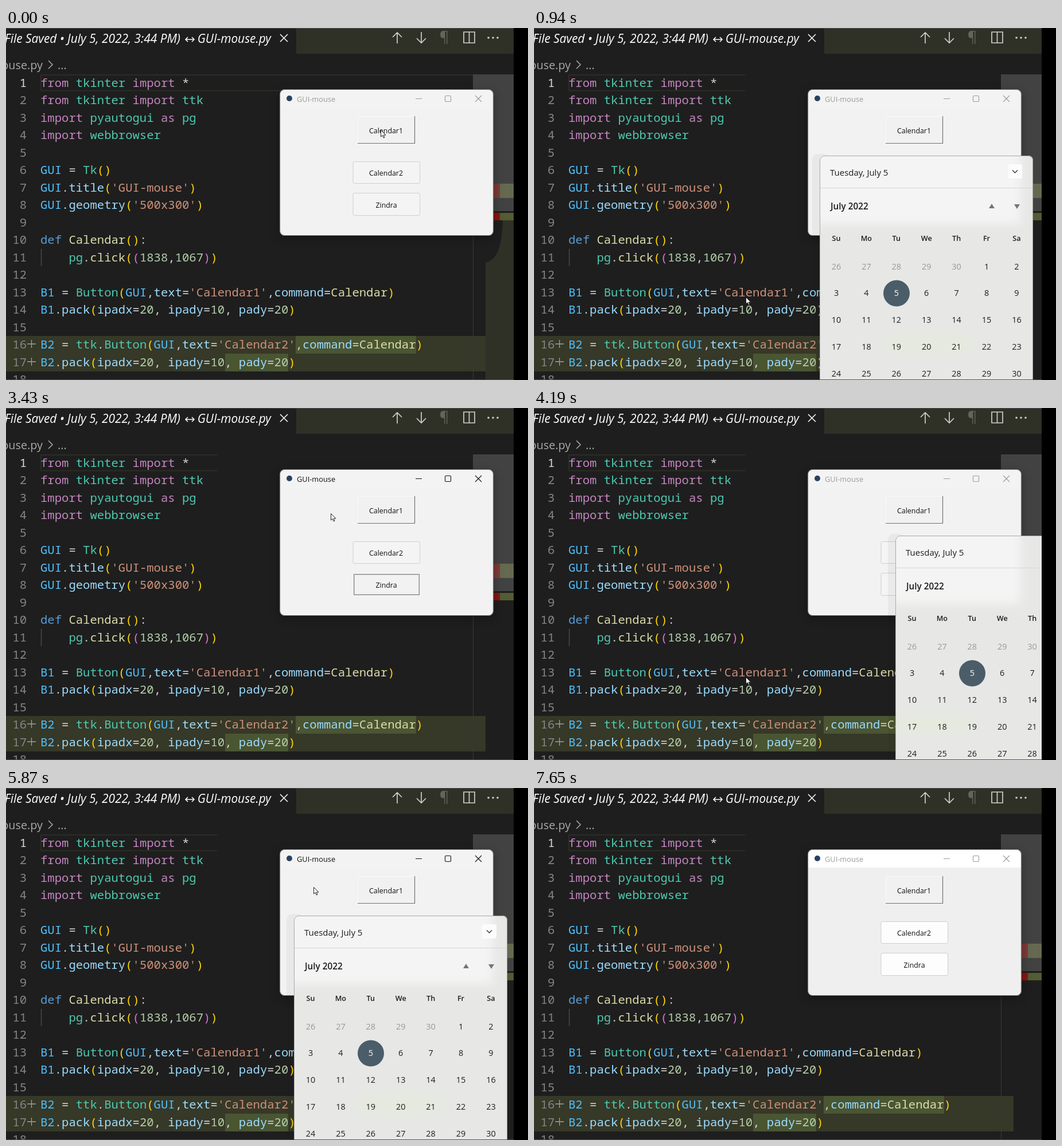
Write an HTML page that moves like this. It is 910 px wide and 615 px high and loops after 7750 ms.

```html
<!DOCTYPE html>
<html lang="en">
<head>
<meta charset="utf-8">
<title>GUI-mouse</title>
<style>
html, body { margin: 0; width: 100%; height: 100%; overflow: hidden; background: #1e1e1e; }
svg { display: block; width: 910px; height: 615px; }
text { font-family: 'Open Sans', 'Noto Sans', sans-serif; white-space: pre; }
.code text { font: 20.59px 'Noto Sans Mono', 'DejaVu Sans Mono', monospace; fill: #858585; }
.k { fill: #c586c0 } .m { fill: #4ec9b0 } .w { fill: #d4d4d4 } .v { fill: #4fc1ff }
.a { fill: #9cdcfe } .s { fill: #ce9178 } .n { fill: #b5cea8 } .d { fill: #569cd6 }
.f { fill: #dcdcaa } .g { fill: #ffd700 } .p { fill: #da70d6 }
.end { text-anchor: end }
.mid { text-anchor: middle }
.line { fill: none; stroke: currentColor }
#win { filter: drop-shadow(0 5px 8px rgba(0, 0, 0, .3)) }
#win text { font-size: 12.4px; fill: #111 }
#win #bar text { font-size: 12.8px; fill: currentColor }
#bar { color: #9b9b9b }
#bar.on { color: #111 }
#cal text { font-size: 14.4px; fill: #1d1d1d }
#cal .head { font-size: 15px }
#cal .month { font-size: 15.3px; font-weight: 600 }
#cal .week { font-size: 12.6px; font-weight: 600 }
#cal .off { fill: #989898 }
#cal .today { fill: #fff }
</style>
</head>
<body>
<svg viewBox="0 0 910 615">
  <defs>
    <filter id="soft" x="-20%" y="-30%" width="140%" height="160%"><feGaussianBlur stdDeviation="8"/></filter>
    <clipPath id="panel"><rect x="498" y="223" width="372" height="420" rx="8"/></clipPath>
  </defs>
  <rect width="910" height="615" fill="#1e1e1e"/>

  <!-- tab bar -->
  <rect x="506" width="379" height="45" fill="#2f3127"/>
  <rect width="885" height="1" fill="#4b4b4b"/>
  <g fill="#fff" font-size="20.9" font-style="italic">
    <text class="end" x="304" y="25.5">(File Saved • July 5, 2022, 3:44 PM)</text>
    <text class="end" x="462" y="25.5">GUI-mouse.py</text>
  </g>
  <path class="line" color="#fff" stroke-width="1.5" d="M313 20H328M317 16l-4 4 4 4M324 16l4 4-4 4M478 11l13 13M491 11l-13 13"/>
  <path class="line" color="#cfcfca" stroke-width="1.7" d="M682 27V8M674 16l8-8 8 8M724 7V26M716 18l8 8 8-8M798 7H817V26H798ZM807.500 7V26"/>
  <text class="mid" x="764" y="24" font-size="25" fill="#63655a">¶</text>
  <g fill="#cfcfca"><circle cx="841" cy="17" r="1.8"/><circle cx="849" cy="17" r="1.8"/><circle cx="857" cy="17" r="1.8"/></g>

  <!-- breadcrumb -->
  <g fill="#a9a9a9" font-size="19.8">
    <text class="end" x="64" y="71.500">GUI-mouse.py</text>
    <text x="90" y="71.500">...</text>
  </g>
  <path class="line" color="#a9a9a9" stroke-width="1.5" d="M74 57l7 7-7 7"/>

  <!-- editor -->
  <rect y="538" width="836" height="62" fill="#363828"/>
  <path fill="#4a5532" d="M505 538H715V569H505ZM382 569H492V600H382Z"/>
  <path id="current" class="line" color="#2c2c27" stroke-width="2"/>
  <path class="line" color="#3a3a3a" d="M814.5 81V615"/>
  <path class="line" color="#484848" stroke-width="1.5" d="M61.500 386V416"/>
  <path class="line" color="#a0a0a0" stroke-width="1.3" d="M37 552H52M44.500 545V559M37 583H52M44.500 576V590"/>
  <g class="code" id="code"></g>

  <!-- overview ruler -->
  <rect x="814" y="81" width="71" height="239" fill="#424242"/>
  <path fill="#7d3a38" d="M849 272H861V297H849Z"/>
  <path fill="#65694f" d="M861 272H885V297H861Z"/>
  <path fill="#8b1313" d="M849 323H861V336H849Z"/>
  <path fill="#535c32" d="M861 323H885V336H861Z"/>
  <path id="stale" fill="#2f3127" d="M836 410C856 405 864 385 866 336H885V615H836Z"/>

  <!-- tk window -->
  <g id="win">
    <rect id="body" x="477.500" y="107.500" width="372" height="255" rx="8"/>
    <path id="top" d="M478 139V116a8 8 0 0 1 8-8H841a8 8 0 0 1 8 8V139Z"/>
    <rect class="line" x="477.500" y="107.500" width="372" height="255" rx="8" color="#777" stroke-width="1.2"/>
    <rect id="patch" x="624" y="109" width="24" height="30" fill="#fff"/>
    <circle cx="494" cy="123" r="5" fill="#29415f"/>
    <g id="bar">
      <text x="507" y="128.5">GUI-mouse</text>
      <path class="line" stroke-width="1.1" d="M714 123.500H725M818 118l11 11M829 118l-11 11"/>
      <rect class="line" x="765.5" y="118.500" width="10" height="10" rx="1.5" stroke-width="1.1"/>
    </g>
    <rect x="613" y="154" width="100" height="48" fill="#f1f1f1"/>
    <path class="line" color="#fafafa" d="M613.5 201V154.500H712"/>
    <path class="line" color="#727272" stroke-width="1.2" d="M613 201.500H712.500V154"/>
    <g class="keys" stroke="#cfcfcf">
      <rect x="605" y="233.500" width="116.500" height="38" rx="2.500"/>
      <rect x="605" y="288.500" width="116.500" height="39" rx="2.500"/>
    </g>
    <g id="focus" fill="#f2f2f2">
      <rect x="604" y="288" width="118" height="40"/>
      <rect class="line" x="606.500" y="290.500" width="114" height="36" color="#868686"/>
      <rect class="line" x="607.500" y="291.500" width="112" height="34" color="#cacaca"/>
    </g>
    <text class="mid" x="662.500" y="183.500">Calendar1</text>
    <text class="mid" x="662.500" y="257.500">Calendar2</text>
    <text class="mid" x="663" y="313.500">Zindra</text>
  </g>

  <!-- calendar flyout -->
  <g id="cal">
    <rect x="485" y="220" width="30" height="420" rx="10" opacity=".045"/>
    <g clip-path="url(#panel)">
      <rect x="498" y="223" width="372" height="420" fill="#e7e7e6"/>
      <rect id="glow" x="470" y="200" width="378" height="142" fill="#f4f4f4" filter="url(#soft)"/>
      <ellipse id="tint" cx="690" cy="552" rx="85" ry="20" fill="#e5e9de" filter="url(#soft)"/>
    </g>
    <rect class="line" x="498.500" y="223.500" width="371" height="420" rx="8" color="#a9a9a9"/>
    <path class="line" color="#d6d6d6" d="M499 279.500H869"/>
    <text class="head" x="516" y="257.500">Tuesday, July 5</text>
    <text class="month" x="517" y="317">July 2022</text>
    <rect x="826" y="238" width="25" height="25" rx="4" fill="#fcfcfc"/>
    <path class="line" color="#333" stroke-width="1.3" d="M834 248.500l4.500 4.500 4.500-4.500"/>
    <path fill="#757575" d="M793 315l5-8 5 8ZM837 308h10l-5 8Z"/>
    <circle cx="632" cy="463.500" r="23" fill="#4b5d69"/>
  </g>

  <rect x="885" width="25" height="615"/>
  <rect y="614" width="885" height="1" fill="#4b4b4b"/>
  <path id="arrow" fill="#fff" stroke="#222" d="M.5 .5V12L3.300 9.500 5.200 14 7 13.200 5.200 9H9Z"/>
  <path id="beam" class="line" color="#d8d8d8" stroke-width="1.2" d="M-3.500-6H-1L0-5 1-6H3.500M0-5V5M-3.500 6H-1L0 5 1 6H3.500"/>
</svg>
<script>
const LOOP = 7750;
const $ = id => document.getElementById(id);

function add(parent, x, y, cls, str) {
  const el = document.createElementNS('http://www.w3.org/2000/svg', 'text');
  el.setAttribute('x', x);
  el.setAttribute('y', y);
  el.setAttribute('class', cls);
  el.textContent = str;
  return parent.appendChild(el);
}

// Each token starts with the letter of its colour class.
const lines = [
  'kfrom |mtkinter |kimport |w*',
  'kfrom |mtkinter |kimport |mttk',
  'kimport |mpyautogui |kas |mpg',
  'kimport |mwebbrowser',
  '',
  'vGUI |w= |mTk|g()',
  "vGUI|w.|atitle|g(|s'GUI-mouse'|g)",
  "vGUI|w.|ageometry|g(|s'500x300'|g)",
  '',
  'ddef |fCalendar|g()|w:',
  'w    |mpg|w.|fclick|g(|p(|n1838|w,|n1067|p)|g)',
  '',
  "vB1 |w= |mButton|g(|vGUI|w,|atext|w=|s'Calendar1'|w,|acommand|w=|fCalendar|g)",
  'vB1|w.|apack|g(|aipadx|w=|n20|w, |aipady|w=|n10|w, |apady|w=|n20|g)',
  '',
  "vB2 |w= |mttk|w.|mButton|g(|vGUI|w,|atext|w=|s'Calendar2'|w,|acommand|w=|fCalendar|g)",
  'vB2|w.|apack|g(|aipadx|w=|n20|w, |aipady|w=|n10|w, |apady|w=|n20|g)',
  ''
];
lines.forEach((line, i) => {
  const y = 103 + i * 30.47;
  add($('code'), 36, y, 'end', i + 1).style.fill = i ? '' : '#dcdcdc';
  const row = add($('code'), 60, y, '', '');
  for (const token of line.split('|')) {
    const span = document.createElementNS('http://www.w3.org/2000/svg', 'tspan');
    span.setAttribute('class', token[0] || 'w');
    span.textContent = token.slice(1);
    row.appendChild(span);
  }
});

const colX = c => 527 + c * 52.4;
['Su', 'Mo', 'Tu', 'We', 'Th', 'Fr', 'Sa'].forEach((d, c) => add($('cal'), colX(c), 372, 'mid week', d));
for (let i = 0; i < 35; i++) {
  const day = i < 5 ? 26 + i : i - 4;
  const cls = i < 5 ? ' off' : day === 5 ? ' today' : '';
  add($('cal'), colX(i % 7), 421.5 + Math.floor(i / 7) * 46.8, 'mid' + cls, day);
}

// [start, x, y, shape]; no shape hides the pointer
const pointer = [
  [0, 653, 178, 'arrow'], [700, 369, 470, 'arrow'],
  [1520, 340, 480, 'beam'], [1650, 317, 482, 'beam'],
  [1800, 228, 488, 'beam'], [1920, 262, 530, 'beam'], [2040, 420, 570, 'beam'], [2160, 592, 583, 'beam'],
  [2310, 720, 588, 'arrow'], [2460, 630, 115, 'arrow'],
  [2590, 627, 98, 'beam'], [2860, 625, 104, 'beam'],
  [3010, 590, 150, 'arrow'], [3130, 566, 184, 'arrow'],
  [3550, 600, 215, 'arrow'], [3670, 655, 247, 'arrow'], [3950, 369, 470, 'arrow'],
  [4340, 340, 469, 'beam'], [4460, 311, 468, 'beam'],
  [4610, 292, 452, 'beam'], [4730, 297, 439, 'beam'], [4880, 306, 439, 'beam'],
  [5030, 626, 332, 'arrow'], [5180, 554, 228, 'arrow'],
  [5590, 542, 195, 'arrow'], [5720, 536, 173, 'arrow'],
  [6390, 0, 0], [6660, 388, 417, 'arrow'], [6810, 0, 0]
];
// [start, distance from the resting place]
const AWAY = 400;
const slide = [
  [0, AWAY], [820, 132], [940, 0], [3290, 60], [3430, AWAY],
  [4070, 300], [4190, 132], [4340, 12], [4460, 0],
  [5870, 4], [6000, 200], [6140, AWAY]
];
const within = (t, ...spans) => spans.some(([a, b]) => t >= a && t < b);
const at = (list, t) => list.findLast(step => step[0] <= t);
const show = (id, on) => { $(id).style.display = on ? '' : 'none'; };

function draw(t) {
  const [, x, y, shape] = at(pointer, t);
  for (const id of ['arrow', 'beam']) {
    show(id, id === shape);
    $(id).setAttribute('transform', `translate(${x} ${y})`);
  }

  const dx = at(slide, t)[1];
  show('cal', dx < AWAY);
  $('cal').setAttribute('transform', `translate(${dx} 0)`);
  // the backdrop glow stays fixed on the stage
  for (const id of ['glow', 'tint']) $(id).setAttribute('transform', `translate(${-dx} 0)`);

  const fresh = t >= 7650;
  $('body').setAttribute('fill', fresh ? '#efefef' : '#f2f2f2');
  $('top').setAttribute('fill', fresh ? '#fff' : '#f3f3f3');
  document.querySelector('.keys').setAttribute('fill', fresh ? '#fdfdfd' : '#f4f4f4');
  $('bar').classList.toggle('on', within(t, [400, 700], [3290, 3950], [5870, 7650]));
  show('focus', within(t, [3290, 3950]));
  show('patch', within(t, [2460, 3290]));
  show('stale', t < 700);
  const right = t < 700 ? 814 : 368;
  $('current').setAttribute('d', `M${right} 82H61V109.5H${right}`);
}

function tick() {
  draw(performance.now() % LOOP);
  requestAnimationFrame(tick);
}
tick();
</script>
</body>
</html>
```
